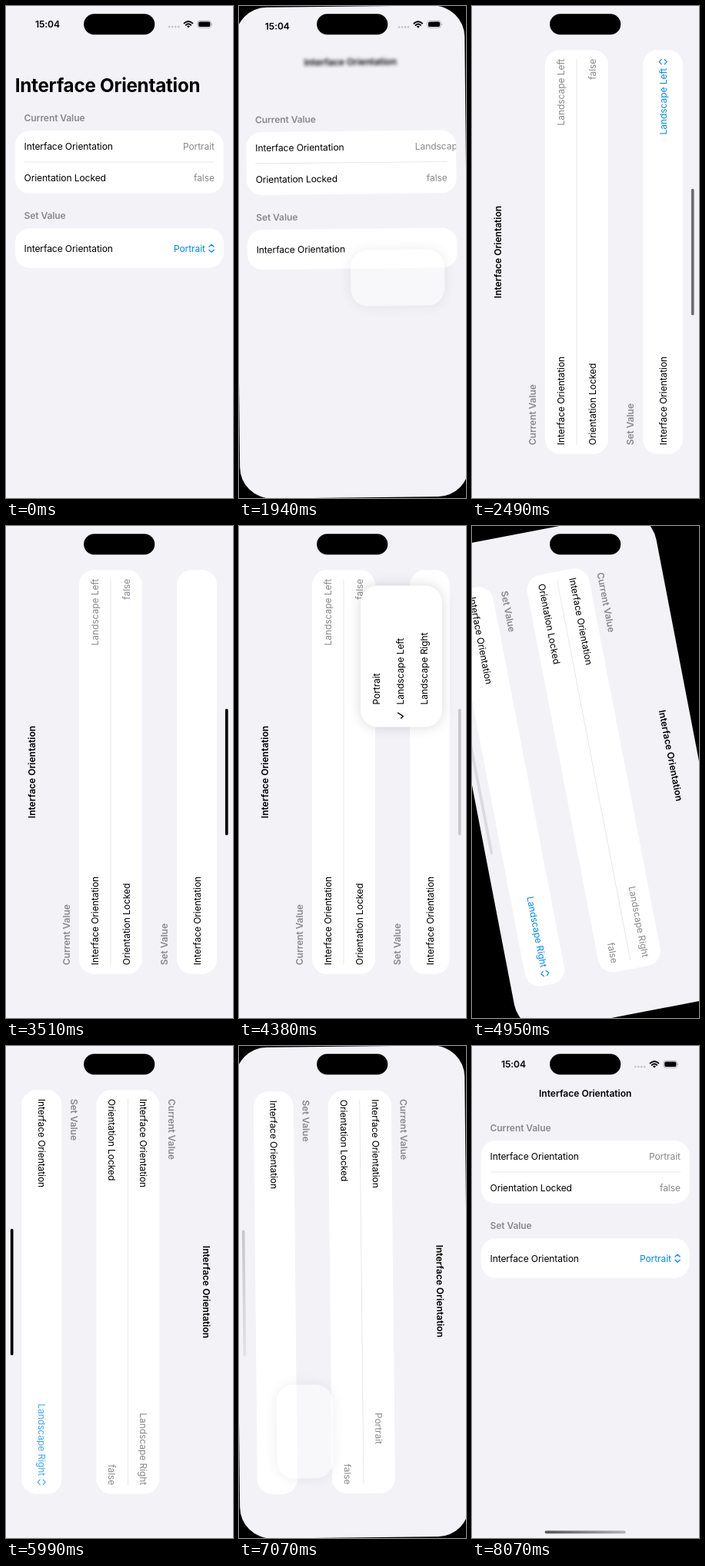
Write an HTML page that moves like this. It is 295 by 640 pixels and loops after 8470 ms.

```html
<!DOCTYPE html>
<html lang="en">
<head>
<meta charset="utf-8">
<title>Interface orientation</title>
<style>
  html, body { margin: 0; width: 100%; height: 100%; overflow: hidden; background: #000; }
  svg { display: block; width: 295px; height: 640px; }
  text { font: 400 12.1px Inter, "Open Sans", sans-serif; letter-spacing: -.009em; fill: #000; }
  .semi { font-weight: 600; }
  .title { letter-spacing: -.003em; }
  .large { font-size: 24.2px; font-weight: 700; letter-spacing: -.01em; }
  .gray { fill: #8a8a8e; }
  .blue { fill: #08f; }
  .line { fill: none; stroke-linecap: round; stroke-linejoin: round; }
  .shadow { filter: drop-shadow(0 0 8px rgba(0, 0, 0, .15)); }
</style>
</head>
<body>
<svg id="stage" viewBox="0 0 295 640">
  <defs>
    <linearGradient id="fade"><stop stop-color="#555"/><stop offset="1" stop-color="#b4b4b8"/></linearGradient>
    <clipPath id="cardClip"><rect id="clipRect" height="82"/></clipPath>
  </defs>
  <rect width="295" height="640"/>
  <g id="win"></g>
  <rect x="101.1" y="10.2" width="92.2" height="27.1" rx="13.55"/>
</svg>
<script>
const LOOP = 8470;
const SHORT = 294.4, LONG = 640;
// Spans in which the picture moves: first step, last step, number of steps.
const SPANS = [
  [930, 1490, 6], [1830, 2590, 8], [2690, 2810, 2], [3400, 3940, 6], [4270, 5060, 8],
  [5180, 5420, 3], [5990, 6530, 6], [6850, 7650, 8], [7750, 8070, 4]
];
const CHOICES = ['Portrait', 'Landscape Left', 'Landscape Right'];
const NAME = 'Interface Orientation';

const win = document.getElementById('win');
const clipRect = document.getElementById('clipRect');

function set(node, attrs) {
  for (const key in attrs) node.setAttribute(key, attrs[key]);
  return node;
}
function add(tag, attrs = {}, parent = win) {
  return parent.appendChild(set(document.createElementNS('http://www.w3.org/2000/svg', tag), attrs));
}
function label(content, cls = '', parent = win) {
  const node = add('text', { class: cls }, parent);
  node.textContent = content;
  return node;
}
// Places text by its left edge and the middle of its capitals.
const place = (node, x, y, size = 12.1) => set(node, { x, y: y + size * .363 });
const lerp = (a, b, k) => a + (b - a) * k;
const ramp = (t, from, to) => Math.min(1, Math.max(0, (t - from) / (to - from)));
const ease = (t, from, to) => (1 - Math.cos(Math.PI * ramp(t, from, to))) / 2;

const back = add('rect', { x: -.6, fill: '#f2f2f7' });

const status = add('g');
place(label('15:04', 'semi', status), 38, 24);
for (let i = 0; i < 4; i++) add('circle', { cx: 212.3 + i * 4, cy: 27, r: 1.3, fill: '#c2c2c6' }, status);
add('path', { class: 'line', stroke: '#000', 'stroke-width': 1.9, 'stroke-linecap': 'butt',
  d: 'M231.6 22.4Q237 17.4 242.4 22.4M233.7 24.7Q237 21.8 240.3 24.7' }, status);
add('path', { d: 'M237 28.4l-2-2.1q2-1.6 4 0z' }, status);
add('rect', { x: 249, y: 19.4, width: 17.6, height: 8.8, rx: 2.9, fill: 'none', stroke: '#9a9a9e', 'stroke-width': .8 }, status);
add('rect', { x: 250.2, y: 20.6, width: 15.2, height: 6.4, rx: 1.9 }, status);
add('path', { d: 'M267.6 22.3q1.6 1.5 0 3z', fill: '#9a9a9e' }, status);

const largeTitle = label(NAME, 'large');
const title = set(label(NAME, 'semi title'), { 'text-anchor': 'middle' });
const headers = ['Current Value', 'Set Value'].map(s => label(s, 'semi gray'));
const cards = [82, 52].map(height => add('rect', { height, rx: 19.5, fill: '#fff' }));
const divider = add('rect', { height: .8, fill: '#e2e2e6' });
const rows = [NAME, 'Orientation Locked', NAME].map(s => label(s));
const value = label('', 'gray', add('g', { 'clip-path': 'url(#cardClip)' }));
const locked = set(label('false', 'gray'), { 'text-anchor': 'end' });
const picker = add('g');
const picked = set(label('', 'blue', picker), { 'text-anchor': 'end' });
const chevrons = add('path', { class: 'line', stroke: '#08f', 'stroke-width': 1.2,
  d: 'M-7.7-2l3.2-3 3.2 3M-7.7 2l3.2 3 3.2-3' }, picker);
const indicator = add('rect', { height: 3.7, rx: 1.85 });

const menu = add('g');
const menuBox = add('rect', { fill: '#fff', class: 'shadow' }, menu);
const menuItems = add('g', {}, menu);
CHOICES.forEach((s, i) => place(label(s, '', menuItems), 29, (i - 1) * 31 - 1));
const check = add('path', { class: 'line', stroke: '#000', 'stroke-width': 1.3 }, menuItems);

const widths = {};
function widthOf(s) {
  if (!widths[s]) {
    value.textContent = s;
    widths[s] = value.getComputedTextLength();
  }
  return widths[s];
}

function held(t) {
  let last = 0;
  for (const [from, to, count] of SPANS) {
    for (let i = 0; i < count; i++) {
      const step = Math.round(lerp(from, to, i / (count - 1)) / 10) * 10;
      if (step <= t) last = step;
    }
  }
  return last;
}

function drawMenu(t, p, W, right, pickerY, choice) {
  const open = ease(t, 930, 1420) - ease(t, 1830, 2050)
    + ease(t, 3400, 3880) - ease(t, 4385, 4620)
    + ease(t, 5990, 6470) - ease(t, 6850, 7070);
  const w = lerp(60, 184, open), h = lerp(40, 106, open);
  const edge = W - lerp(28.5, 77.5, p);
  const cy = lerp(pickerY, lerp(354, 211, p), Math.min(1, open * 2));
  set(menu, { opacity: Math.min(1, open * open * 2), visibility: open > .01 ? 'visible' : 'hidden' });
  set(menuBox, { x: edge - w, y: cy - h / 2, width: w, height: h, rx: Math.min(22, h / 2) });
  set(menuItems, { transform: `translate(${edge - w} ${cy})`, opacity: ramp(open, .6, 1) });
  check.setAttribute('d', `M11.5 ${(choice - 1) * 31 - .5}l2.4 3 4.6-7`);

  const shown = 1 - ramp(t, 900, 1020) + ramp(t, 2050, 2250)
    - ramp(t, 3370, 3490) + ramp(t, 4520, 4700)
    - ramp(t, 5960, 6080) + ramp(t, 7400, 7800);
  picker.setAttribute('opacity', shown);
  picked.textContent = CHOICES[choice];
  place(picked, right - 12, pickerY);
  chevrons.setAttribute('transform', `translate(${right + .7} ${pickerY})`);
}

function draw(t) {
  const turns = [ease(t, 1911, 2470), ease(t, 4381, 5057), ease(t, 6925, 7600)];
  const [toLeft, toRight, toUpright] = turns;
  const p = toLeft - toUpright;
  const turning = turns.some(k => k > 0 && k < 1);
  const returning = toUpright > 0;
  const choice = returning ? 0 : toRight > 0 ? 2 : toLeft > 0 ? 1 : 0;
  const previous = returning ? 2 : Math.max(0, choice - 1);
  const current = returning ? toUpright : toRight > 0 ? toRight : toLeft;

  const W = lerp(SHORT, LONG, p), H = lerp(LONG, SHORT, p);
  const angle = -90 * toLeft + 180 * toRight - 90 * toUpright;
  win.setAttribute('transform',
    `translate(${SHORT / 2} ${LONG / 2}) rotate(${angle}) translate(${-W / 2} ${-H / 2})`);
  set(back, { y: -.6, width: W + 1.2, height: H + 1.2, rx: turning ? 41 : 0 });
  status.setAttribute('opacity', 1 - ramp(t, 1950, 2150) + ramp(t, 7600, 8000));

  const dy = lerp(returning ? -39 : 0, -67, p);
  const inset = lerp(11.7, 57, p), left = inset + 11.8, right = W - left;
  place(largeTitle, 11.7, 103.5, 24.2).setAttribute('opacity', toLeft > 0 ? 0 : 1);
  place(title, W / 2, lerp(returning ? 61.5 : 72, 34, p)).setAttribute('opacity', toLeft > 0 ? 1 : 0);
  const blur = 2.2 * (1 - ramp(t, 1940, 2200));
  title.style.filter = blur > 0 ? `blur(${blur}px)` : 'none';

  [146, 273].forEach((y, i) => place(headers[i], left, y + dy));
  [162, 289].forEach((y, i) => set(cards[i], { x: inset, y: y + dy, width: W - 2 * inset }));
  set(clipRect, { x: inset, y: 162 + dy, width: W - 2 * inset });
  set(divider, { x: left, y: 202.6 + dy, width: right - left });
  [182.7, 223.7, 315.2].forEach((y, i) => place(rows[i], left, y + dy));

  const span = lerp(widthOf(CHOICES[previous]), widthOf(CHOICES[choice]), Math.min(1, current * 2));
  value.textContent = CHOICES[choice];
  place(value, right - (current > 0 ? span : widthOf(CHOICES[0])), 182.7 + dy);
  place(locked, right, 223.7 + dy);

  const bar = lerp(105, 164.5, p);
  const barOpacity = ramp(t, 2150, 2750) - ramp(t, 4265, 4405)
    + ramp(t, 4900, 5420) - ramp(t, 6850, 7000) + ramp(t, 7350, 7650);
  set(indicator, { x: (W - bar) / 2, y: H - 9.5, width: bar, opacity: barOpacity,
    fill: returning ? 'url(#fade)' : '#000' });

  drawMenu(t, p, W, right, 315.2 + dy, choice);
}

const start = performance.now();
function frame() {
  draw(held((performance.now() - start) % LOOP));
  requestAnimationFrame(frame);
}
frame();
</script>
</body>
</html>
```
